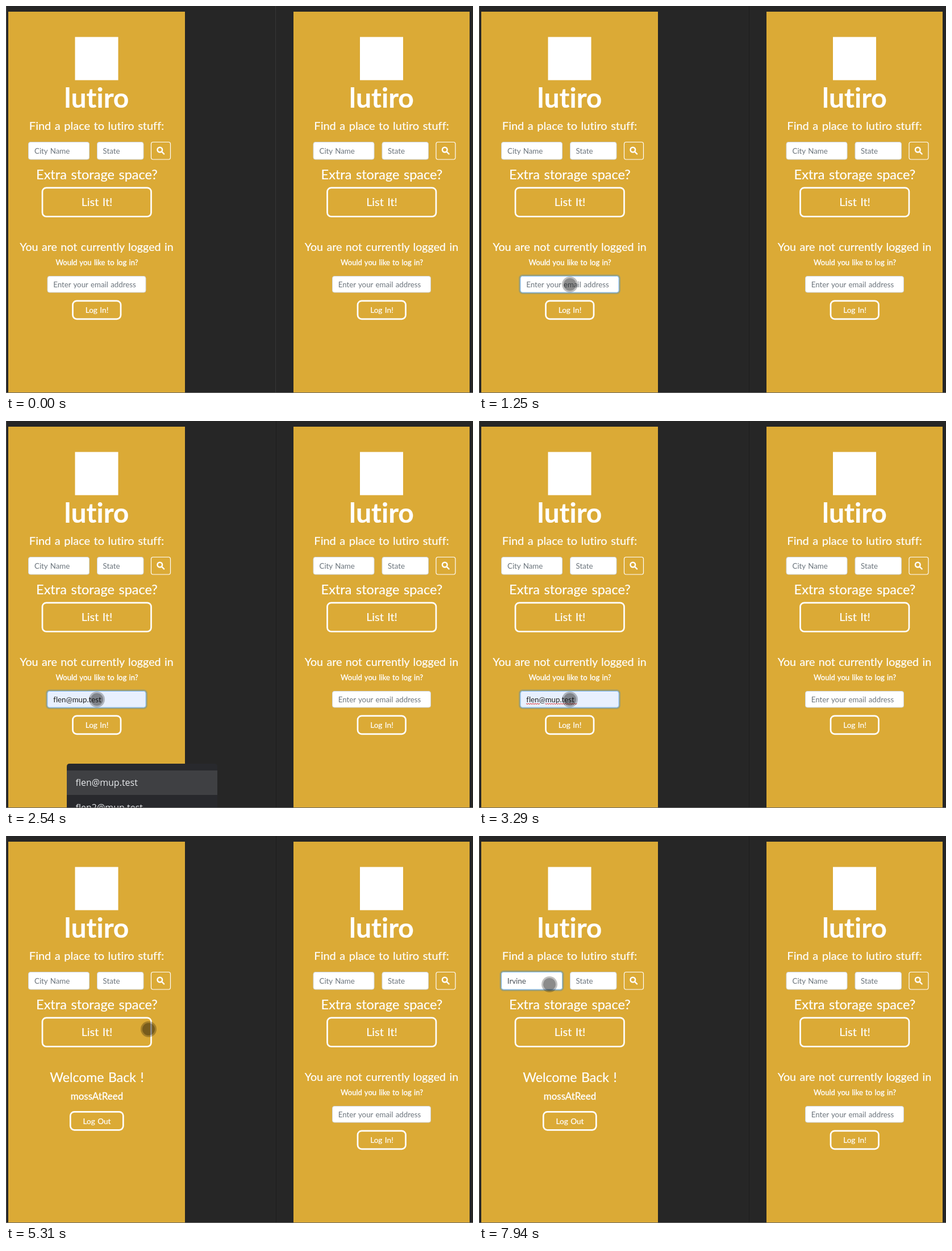
An HTML page that plays this animation: 822x681 px, repeating every 8000 ms.

```html
<!DOCTYPE html>
<html lang="en">
<head>
<meta charset="utf-8">
<title>Storage finder login</title>
<style>
  html, body { margin: 0; width: 100%; height: 100%; overflow: hidden; background: #262626; }
  svg { display: block; }
  text { font-family: Lato, sans-serif; font-variant-ligatures: none; word-spacing: .07em; white-space: pre; }
  .label { fill: #fff; stroke: #fff; stroke-width: .2px; text-anchor: middle; }
  .brand { font-weight: 700; }
  .medium { stroke-width: .35px; }
  .hint { fill: #6c757d; font-size: 13.3px; }
  .input { fill: #fff; stroke: #ced4da; }
  .button { fill: none; stroke: #fff; stroke-width: 2.7px; }
  .option { fill: #e8eaed; font: 500 16px "Open Sans", sans-serif; }
</style>
</head>
<body>
<svg width="822" height="681" viewBox="0 0 822 681">
  <defs>
    <g id="search">
      <rect x="121.5" y="54.5" width="76" height="76" fill="#fff"/>
      <text class="label brand" x="159.5" y="178.5" font-size="48">lutiro</text>
      <text class="label" x="159.5" y="218" font-size="20">Find a place to lutiro stuff:</text>
      <rect class="input" x="39.5" y="239.5" width="107" height="30.5" rx="3.5"/>
      <text class="hint" x="50" y="259.5">City Name</text>
      <rect class="input" x="160.5" y="239.5" width="81.5" height="30.5" rx="3.5"/>
      <text class="hint" x="170.5" y="259.5">State</text>
      <rect class="button" x="255.5" y="239.5" width="34" height="30.5" rx="3.5" style="stroke-width:1.2px"/>
      <g fill="none" stroke="#fff" stroke-width="2.4" stroke-linecap="round">
        <circle cx="270.8" cy="253" r="4.3"/>
        <path d="M274.3 256.5l3.8 3.8"/>
      </g>
      <text class="label" x="160" y="305" font-size="23.5">Extra storage space?</text>
      <rect class="button" x="64" y="319.8" width="191.5" height="50.7" rx="7"/>
      <text class="label" x="160" y="352" font-size="19.8">List It!</text>
    </g>
    <g id="login">
      <text class="label" x="159.5" y="430.5" font-size="19.7">You are not currently logged in</text>
      <text class="label medium" x="160" y="456" font-size="13.1">Would you like to log in?</text>
      <rect class="input" x="73" y="475.5" width="173" height="28.5" rx="3.5"/>
      <text class="hint" x="83.3" y="494.5">Enter your email address</text>
      <rect class="button" x="117.5" y="518.8" width="84.5" height="32" rx="7"/>
      <text class="label" x="160" y="540" font-size="13.6">Log In!</text>
    </g>
  </defs>

  <rect width="822" height="681" fill="#262626"/>
  <rect id="divider" y="0" width="1" height="681"/>
  <rect width="1" height="681" fill="#4c4c4c"/>
  <path d="M4 10h311v671h-311zM506 10h310v671h-310z" fill="#dbaa36"/>

  <use href="#search"/>
  <use id="leftLogin" href="#login"/>
  <g id="welcome">
    <text class="label" x="160" y="433" font-size="23.1">Welcome Back !</text>
    <text class="label medium" x="160" y="463.5" font-size="16.9">mossAtReed</text>
    <rect class="button" x="113.3" y="485.3" width="93" height="32" rx="7"/>
    <text class="label" x="160" y="506.5" font-size="13.6">Log Out</text>
  </g>
  <g transform="translate(501.5)">
    <use href="#search"/>
    <use href="#login"/>
  </g>

  <g id="focus">
    <rect id="ring" fill="none" stroke="#007bff" stroke-opacity=".25" stroke-width="3" rx="5"/>
    <rect id="box" stroke="#80bdff" rx="3.5"/>
    <text id="value" class="hint" x="10.3"></text>
    <path id="squiggle" fill="none" stroke="#e02020"/>
    <path id="caret" stroke="#333"/>
  </g>

  <g id="menu">
    <path d="M107 681v-73q0-5 5-5h255q5 0 5 5v73z" fill="#28292d"/>
    <rect id="hover" x="107" y="615" width="265" height="43" fill="#3f4043"/>
    <text class="option" x="122.5" y="642">flen@mup.test</text>
    <text class="option" x="122.5" y="686">flen2@mup.test</text>
  </g>

  <g id="pointer">
    <circle r="14" fill-opacity=".25"/>
    <circle r="11" fill-opacity=".27"/>
  </g>
  <rect y="680" width="822" height="1" fill="#6a6a6a"/>
</svg>
<script>
const LOOP = 8000;
const EMAIL = 'flen@mup.test';
const el = id => document.getElementById(id);
const set = (node, attrs) => {
  for (const key in attrs) node.setAttribute(key, attrs[key]);
};
const show = (id, on) => set(el(id), { visibility: on ? 'visible' : 'hidden' });
const within = (t, ...spans) => spans.some(([from, to]) => t >= from && t < to);

// Pointer stops: time, x, y
const path = [
  [180, 330, 695], [710, 154, 490], [800, 154, 490], [880, 160, 490],
  [4300, 160, 490], [4490, 220, 489], [4600, 220, 489], [4670, 197, 505],
  [4880, 197, 505], [5040, 219, 487], [5130, 219, 487], [5220, 238, 415],
  [5310, 251, 340], [5390, 251, 340], [6020, 124, 261], [LOOP, 124, 261]
];

const fields = [
  { from: 800, to: 4210, x: 73, y: 475.5, w: 173, h: 28.5, hint: 'Enter your email address',
    typed: [[1620, 'f'], [1710, 'fl'], [1800, 'fle'], [1980, 'flen'], [2540, EMAIL], [3930, '']] },
  { from: 6210, to: LOOP, x: 39.5, y: 239.5, w: 107, h: 30.5, hint: 'City Name',
    typed: [[6660, 'I'], [6930, 'Ir'], [7210, 'Irv'], [7300, 'Irvi'], [7390, 'Irvin'], [7480, 'Irvine']] }
];

function pointerAt(t) {
  const i = Math.max(1, path.findIndex(stop => stop[0] > t));
  const [t0, x0, y0] = path[i - 1], [t1, x1, y1] = path[i];
  const k = (t - t0) / (t1 - t0);
  return [x0 + (x1 - x0) * k, y0 + (y1 - y0) * k];
}

function wave(from, to) {
  let d = `M${from} 21.5`;
  for (let x = from; x < to; x += 4) d += 'l2 1.5l2-1.5';
  return d;
}

function drawField(t) {
  const f = fields.find(f => within(t, [f.from, f.to]));
  const filled = within(t, [2540, 3930]);
  const marked = within(t, [2730, 3930]);
  show('focus', f);
  show('squiggle', marked);
  show('caret', f && !filled && !within(t, [1250, 1620], [7940, LOOP]) ||
    within(t, [2730, 3290], [3850, 3930]));
  if (!f) return;

  const text = f.typed.reduce((now, [at, s]) => t >= at ? s : now, '');
  const value = el('value');
  set(el('focus'), { transform: `translate(${f.x} ${f.y})` });
  set(el('box'), { width: f.w, height: f.h, fill: filled ? '#e8f0fe' : '#fff' });
  set(el('ring'), { x: -1.5, y: -1.5, width: f.w + 3, height: f.h + 3,
    opacity: Math.min(1, (t - f.from) / 80) });
  value.textContent = text || f.hint;
  value.style.fill = filled ? '#222' : text ? '#495057' : '#6c757d';
  set(value, { y: f.h / 2 + 4.75 });

  const x = Math.round(10.3 + (text ? value.getComputedTextLength() : 0)) + .5;
  set(el('caret'), { d: `M${x} ${f.h / 2 - 9}v18` });
  if (marked) {
    const name = value.getSubStringLength(0, 4), at = value.getSubStringLength(0, 5);
    set(el('squiggle'), { d: wave(10, 10 + name) + wave(10 + at, x) });
  }
}

function draw(t) {
  const early = t < 180;
  set(el('divider'), { x: early ? 474 : 475, fill: early ? '#363636' : '#1c1c1c' });
  show('leftLogin', t < 4210);
  show('welcome', t >= 4210);
  drawField(t);
  show('menu', within(t, [1620, 2730]));
  show('hover', within(t, [2540, 2730]));
  show('pointer', !early);
  set(el('pointer'), { transform: `translate(${pointerAt(t)})` });
}

const start = performance.now();
function tick() {
  draw((performance.now() - start) % LOOP);
  requestAnimationFrame(tick);
}
tick();
</script>
</body>
</html>
```
